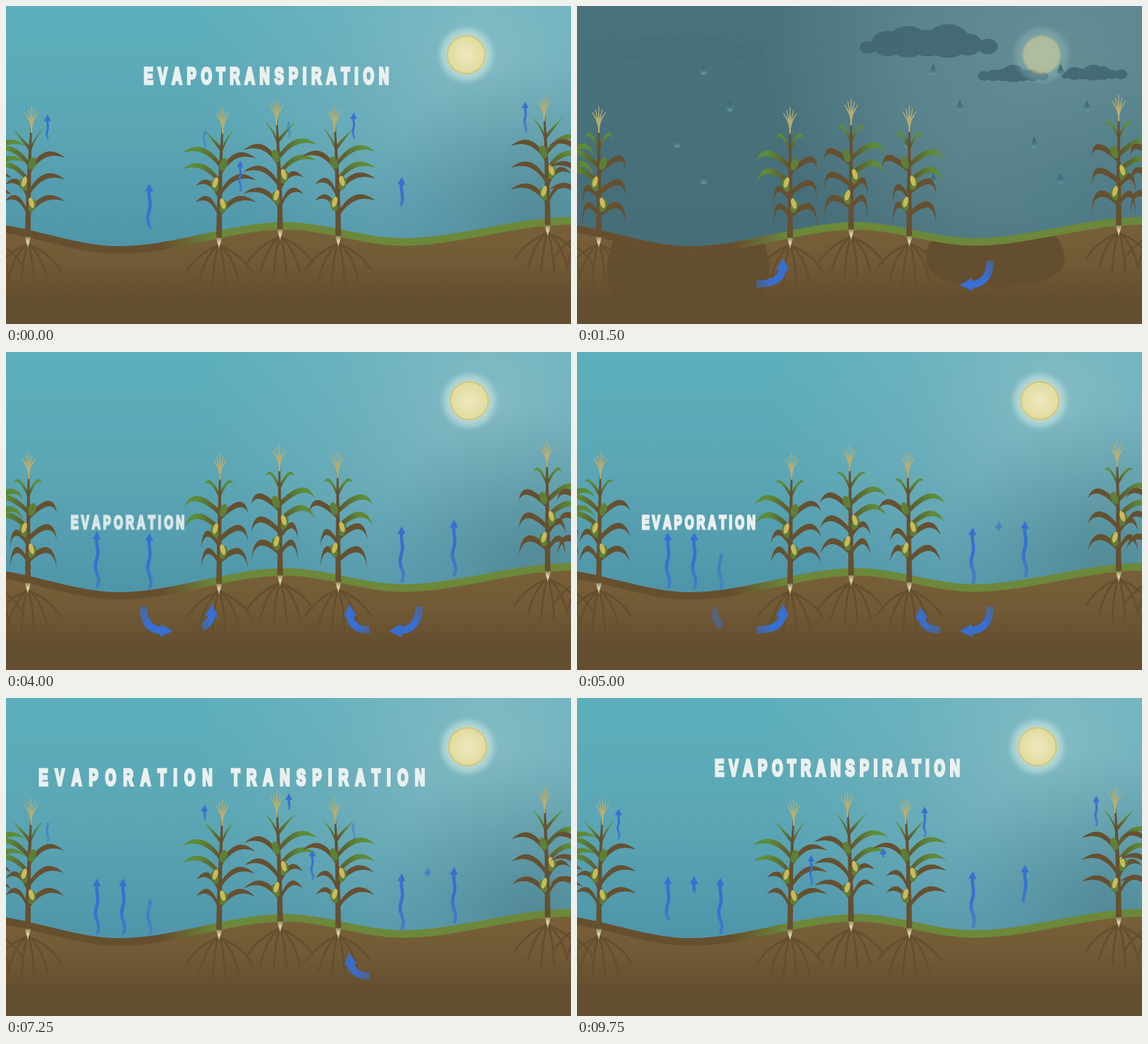
An HTML page with a canvas that plays this animation: 777x437 px, repeating every 10000 ms.

```html
<!DOCTYPE html>
<html lang="en">
<head>
<meta charset="utf-8">
<title>Evapotranspiration</title>
<style>
html, body { margin: 0; width: 100%; height: 100%; overflow: hidden; }
canvas { display: block; }
</style>
</head>
<body>
<canvas id="stage" width="777" height="437"></canvas>
<script>
const W = 777, H = 437, LOOP = 10000, STEP = 250, CYCLE = 1125;
const ctx = document.getElementById('stage').getContext('2d');
const BROWN = '#655030', GREEN = '#5e8b38', DARK = '#634e2f', BLUE = '#376fd2';

const clamp = v => Math.max(0, Math.min(1, v));
const ramp = (t, a, b) => clamp((t - a) / (b - a));
const smooth = (t, a, b) => { const k = ramp(t, a, b); return k * k * (3 - 2 * k); };
const mix = (a, b, k) => a + (b - a) * k;
const mod = (a, n) => ((a % n) + n) % n;

function gradient(g, ...stops) {
  stops.forEach((color, i) => g.addColorStop(i / (stops.length - 1), color));
  return g;
}
const vertical = (y0, y1, ...stops) => gradient(ctx.createLinearGradient(0, y0, 0, y1), ...stops);
const radial = (x, y, r0, r1, ...stops) => gradient(ctx.createRadialGradient(x, y, r0, x, y, r1), ...stops);

function wash(style) {
  ctx.fillStyle = style;
  ctx.fillRect(0, 0, W, H);
}

function disc(x, y, rx, ry, style, angle = 0) {
  ctx.fillStyle = style;
  ctx.beginPath();
  ctx.ellipse(x, y, rx, ry, angle, 0, 7);
  ctx.fill();
}

function curve(x0, y0, cx, cy, x1, y1) {
  ctx.beginPath();
  ctx.moveTo(x0, y0);
  ctx.quadraticCurveTo(cx, cy, x1, y1);
  ctx.stroke();
}

// ---- sky ----
function drawCloud(x, y, width) {
  ctx.beginPath();
  for (let i = 0; i < 7; i++) {
    const u = i / 6, r = width * (.07 + .06 * Math.sin(Math.PI * u) + .02 * Math.sin(i * 2.4 + x));
    const px = x + u * width, py = y - r * .6;
    ctx.moveTo(px + r * 1.3, py);
    ctx.ellipse(px, py, r * 1.3, r, 0, 0, 7);
  }
  ctx.fill();
}

function drawSky(t, storm) {
  const sunX = mix(640, 633, t / LOOP), sunY = 67;
  wash(vertical(0, 330, '#5cafbc', '#5ba6b5', '#4f95a9'));
  wash(`rgba(68,102,110,${.82 * storm})`);
  wash(radial(sunX + 25, sunY, 20, 400, `rgba(165,200,204,${.5 - .2 * storm})`, 'rgba(150,190,197,.24)', 'rgba(150,190,197,0)'));
  wash(radial(720, 285, 10, 210, 'rgba(70,118,130,.5)', 'rgba(70,125,138,0)'));

  ctx.fillStyle = '#40656f';
  ctx.globalAlpha = .2 * storm;
  drawCloud(75, 72, 165);
  ctx.globalAlpha = .85 * storm;
  drawCloud(400, 62, 165);
  drawCloud(560, 100, 80);
  drawCloud(672, 98, 76);

  ctx.globalAlpha = 1 - .7 * storm;
  disc(sunX, sunY, 42, 42, radial(sunX, sunY, 26, 42, 'rgba(195,222,212,.9)', 'rgba(170,212,213,.75)', 'rgba(150,200,206,0)'));
  disc(sunX, sunY, 27, 27, '#cfc67f');
  disc(sunX, sunY, 25, 25, radial(sunX, sunY, 4, 25, '#ebe7bb', '#e2dc9f'));
  ctx.globalAlpha = 1;
}

function drawRain(t, storm) {
  ctx.globalAlpha = storm;
  for (const groupX of [174, 490, 665]) for (let i = 0; i < 4; i++) {
    const x = groupX + 42 * Math.sin(i * Math.PI * 2 / 3);
    const y = 70 + mod(20 + i * 50 + (t - 1500) * .4, 240);
    ctx.fillStyle = vertical(y - 10, y + 5, '#3f6670', '#456f79', '#5d9cab');
    ctx.beginPath();
    ctx.moveTo(x, y - 11);
    ctx.quadraticCurveTo(x + 2, y - 5, x + 5, y);
    ctx.arc(x, y, 5, 0, Math.PI);
    ctx.quadraticCurveTo(x - 2, y - 5, x, y - 11);
    ctx.fill();
  }
  ctx.globalAlpha = 1;
}

// ---- ground ----
const hills = [[-40, 298], [155, 330], [385, 297], [545, 319], [777, 290], [900, 300]];

function groundY(x) {
  const i = hills.findIndex(([hx]) => hx > x);
  const [[x0, y0], [x1, y1]] = [hills[i - 1], hills[i]];
  return mix(y0, y1, smooth(x, x0, x1));
}

function groundPath(depth) {
  ctx.beginPath();
  for (let x = 0; x <= W + 3; x += 4) ctx.lineTo(x, groundY(x) + depth);
  ctx.lineTo(W, H);
  ctx.lineTo(0, H);
}

function wetPatch(x0, x1, flare, depth) {
  const mid = (x0 + x1) / 2;
  ctx.beginPath();
  ctx.moveTo(x0, 280);
  ctx.lineTo(x1, 280);
  ctx.lineTo(x1, 312);
  ctx.bezierCurveTo(x1 + flare, 345, x1 + flare, depth, mid, depth);
  ctx.bezierCurveTo(x0 - flare, depth, x0 - flare, 345, x0, 312);
  ctx.fill();
}

function drawGround(t) {
  groundPath(0);
  ctx.fillStyle = gradient(ctx.createLinearGradient(215, 0, 290, 0), '#664f2e', '#6c883a');
  ctx.fill();

  ctx.save();
  groundPath(10.5);
  ctx.clip();
  wash(vertical(305, 402, '#775f39', '#715a35', DARK));
  const soak = ramp(t, 500, 1500), spread = ramp(t, 1500, 2750);
  if (soak > 0) {
    ctx.globalAlpha = 1 - ramp(t, 2900, 4000);
    ctx.fillStyle = DARK;
    wetPatch(mix(58, 36, spread), 248, mix(30 * soak, 100, spread), mix(mix(320, 450, soak), 560, spread));
    wetPatch(495, 655, mix(28 * soak, 110, spread), mix(mix(310, 386, soak), 540, spread));
  }
  ctx.restore();
}

// ---- corn ----
// x, facing, side of the long lower leaf
const plants = [[-24, -1, 1], [30, 1, 1], [293, 1, 1], [377, -1, 1], [457, -1, -1], [745, -1, 1], [798, -1, 1]];

function drawLeaf(side, level, reach, green, lean, droop) {
  const top = level === 1, y = mix(-33, -123, level), x = lean * level * .8;
  const cx = side * reach * mix(.5, .8, droop);
  const cy = y - mix(top ? 14 : 36, 34, droop);
  const tipX = side * reach * mix(1, green ? .92 : .72, droop);
  const tipY = y + mix(top ? -28 : -18, mix(18, -12, level), droop);
  const thick = top ? 3 : 5;
  ctx.fillStyle = green ? gradient(ctx.createLinearGradient(x, y, tipX, tipY), BROWN, '#5b6d33', GREEN, GREEN) : BROWN;
  ctx.beginPath();
  ctx.moveTo(x, y - 3);
  ctx.quadraticCurveTo(cx - side * thick / 2, cy - thick, tipX, tipY);
  ctx.quadraticCurveTo(cx - side * thick, cy + thick * 1.4, x, y + 5);
  ctx.fill();
}

function drawPlant([x, facing, lower], droop) {
  ctx.save();
  ctx.translate(x, groundY(x) + 12);
  ctx.scale(facing, 1);
  ctx.lineCap = 'round';
  const lean = mix(5, 0, droop);

  ctx.strokeStyle = '#644f2e';
  ctx.lineWidth = 2.8;
  for (let u = -1; u <= 1; u += .4) curve(0, 8, u * 30, 20, u * 45, 64 - 20 * u * u);

  for (const [side, count] of [[-1, 5], [1, 4]]) for (let i = 0; i < count; i++) {
    const level = i / (count - 1), top = level === 1;
    const flip = level < .5 ? lower : 1;
    const reach = top ? 21 : side < 0 && level < .5 ? 32 : 51;
    drawLeaf(side * flip, level, reach, top || (side < 0 && level >= .5), lean, droop);
  }

  ctx.fillStyle = BROWN;
  ctx.beginPath();
  ctx.moveTo(-4, 0);
  ctx.quadraticCurveTo(-2.5, -80, lean - 1, -158);
  ctx.lineTo(lean + 1, -158);
  ctx.quadraticCurveTo(3.5, -80, 4, 0);
  ctx.fill();
  ctx.fillStyle = vertical(-2, 12, '#8f8a58', '#ddd6b0', '#b8a878');
  ctx.beginPath();
  ctx.moveTo(-4, -2);
  ctx.lineTo(4, -2);
  ctx.lineTo(0, 13);
  ctx.fill();

  for (let i = 0; i < 3; i++) {
    const side = i % 2 ? -1 : 1, earX = side * 5, earY = -48 - 29 * i;
    disc(earX + side, earY + 3, 5, 9, '#5e7f37', side * .3);
    if (i < 2) disc(earX, earY - 1, 3.4, 7.5, '#c9ba5c', side * -.3);
  }

  ctx.strokeStyle = '#b9ae70';
  ctx.lineWidth = 1.2;
  for (let i = -2; i <= 2; i++) {
    const spread = Math.abs(i);
    curve(lean, -150, lean + i, -164, lean + i * 4.5, -181 + spread * 4);
    curve(lean, -158, lean + i * 2, -166, lean + i * 3, -171 + spread * 2);
  }
  ctx.lineWidth = 2.2;
  curve(lean, -146, lean, -154, lean, -162);
  ctx.restore();
}

// ---- arrows ----
// An arrow grows from its tail, rests, then its tail catches up with the head.
function drawArrow(path, age, width) {
  if (age < 0 || age > 800) return;
  const end = Math.max(.05, 1 - (1 - ramp(age, -40, 150)) ** 2);
  const start = Math.min(end - .04, ramp(age, 480, 800));
  const [x, y] = path(end), [bx, by] = path(end - .08);
  ctx.globalAlpha = clamp(.3 + age / 170) * ramp(800, age, age + 60);
  ctx.strokeStyle = gradient(ctx.createLinearGradient(...path(start), x, y), 'rgba(55,111,210,.6)', BLUE, BLUE);
  ctx.lineWidth = width;
  ctx.lineCap = 'butt';
  ctx.beginPath();
  for (let i = 0; i <= 24; i++) ctx.lineTo(...path(mix(start, end, i / 24)));
  ctx.stroke();
  if (age > 80) {
    const half = width * .6 + 2.9;
    ctx.save();
    ctx.translate(x, y);
    ctx.rotate(Math.atan2(y - by, x - bx));
    ctx.fillStyle = BLUE;
    ctx.beginPath();
    ctx.moveTo(half * 1.3, 0);
    ctx.lineTo(-half * .6, -half);
    ctx.lineTo(-half * .6, half);
    ctx.fill();
    ctx.restore();
  }
  ctx.globalAlpha = 1;
}

// Time since birth within the shared cycle; only births between two moments count.
function ageOf(t, offset, from, to) {
  const age = mod(t - 9750 + offset, CYCLE), birth = t - age;
  return birth > from && birth <= to ? age : -1;
}

function rising(x, lift, length, width, age) {
  const base = groundY(x) - lift - age * .012;
  drawArrow(s => [x + Math.sin(s * 11) * length * .035 * (1 - s * s), base - s * length], age, width);
}

function seeping(x, dx, down, age) {
  const [y0, y1] = down ? [350, 383] : [382, 358];
  const [cx, cy] = down ? [x, y1] : [x + dx, y0];
  drawArrow(s => {
    const r = 1 - s;
    return [r * r * x + 2 * r * s * cx + s * s * (x + dx), r * r * y0 + 2 * r * s * cy + s * s * y1];
  }, age, 10);
}

function drawArrows(t) {
  const seepAge = (offset, to = 6000) => ageOf(t, offset, 1000, to);
  seeping(189, 29, true, seepAge(280));
  seeping(247, 36, false, seepAge(730));
  seeping(500, -27, false, seepAge(350, 7200));
  seeping(568, -30, true, seepAge(550));

  [555, 730, 300, 400, 1020, 595].forEach((offset, i) =>
    rising((i < 3 ? 125 : 544) + i % 3 * 36, -1, 70, 4.5, ageOf(t, offset, 3400, 9850)));

  const breathe = (x, offset, lift = 116) => rising(x, lift, 36, 3, ageOf(t, offset, 5600, LOOP));
  breathe(57, 300);
  breathe(273, 915);
  breathe(322, 200, 43);
  breathe(389, 905);
  breathe(421, 740, 43);
  breathe(478, 280);
  breathe(714, 230);
}

// ---- titles ----
function drawWord(word, x, y, size, gap, alphaOf) {
  const condensed = .62 * size;
  ctx.font = 'bold 31px "Liberation Sans", Arial, sans-serif';
  ctx.fillStyle = ctx.strokeStyle = '#eaf0ef';
  ctx.lineWidth = 3.6;
  ctx.lineJoin = 'miter';
  ctx.miterLimit = 3;
  [...word].forEach((letter, i) => {
    ctx.globalAlpha = alphaOf(i);
    ctx.save();
    ctx.translate(x, y);
    ctx.scale(condensed, size);
    ctx.fillText(letter, 0, 0);
    ctx.strokeText(letter, 0, 0);
    ctx.restore();
    x += ctx.measureText(letter).width * condensed + gap;
  });
  ctx.globalAlpha = 1;
}

function drawTitles(t) {
  const rise = smooth(t, 5300, 6400), join = smooth(t, 8100, 9100);
  const y = mix(120, 107, clamp(join * 1.4));
  const first = ramp(t, 3700, 4100), second = ramp(t, 5900, 6300);
  const leaving = i => i < 5 ? 1 : clamp((8800 + (6 - i) * 100 - t) / 100);
  drawWord('EVAPORATION', mix(mix(89, 45, rise), 189.5, join), mix(243, y, rise), mix(.84, 1, rise),
    mix(mix(3.8, 9.8, rise), 6.6, join), i => first * leaving(i));
  drawWord('TRANSPIRATION', mix(310, 289.5, join), y, 1,
    mix(mix(7, 9, smooth(t, 5900, 7250)), 6.6, join), () => second);
}

function draw(t) {
  const storm = smooth(t, 250, 900) * (1 - smooth(t, 1800, 2500));
  const droop = 1 - smooth(t, 2000, 8500);
  drawSky(t, storm);
  drawRain(t, storm);
  drawGround(t);
  for (const plant of plants) drawPlant(plant, droop);
  drawArrows(t);
  drawTitles(t);
}

const begin = performance.now();
function tick() {
  const elapsed = Math.max(0, performance.now() - begin) % LOOP;
  // The closing picture is held through the first step of the loop.
  draw(Math.floor(elapsed / STEP) * STEP || LOOP);
  requestAnimationFrame(tick);
}
tick();
</script>
</body>
</html>
```
